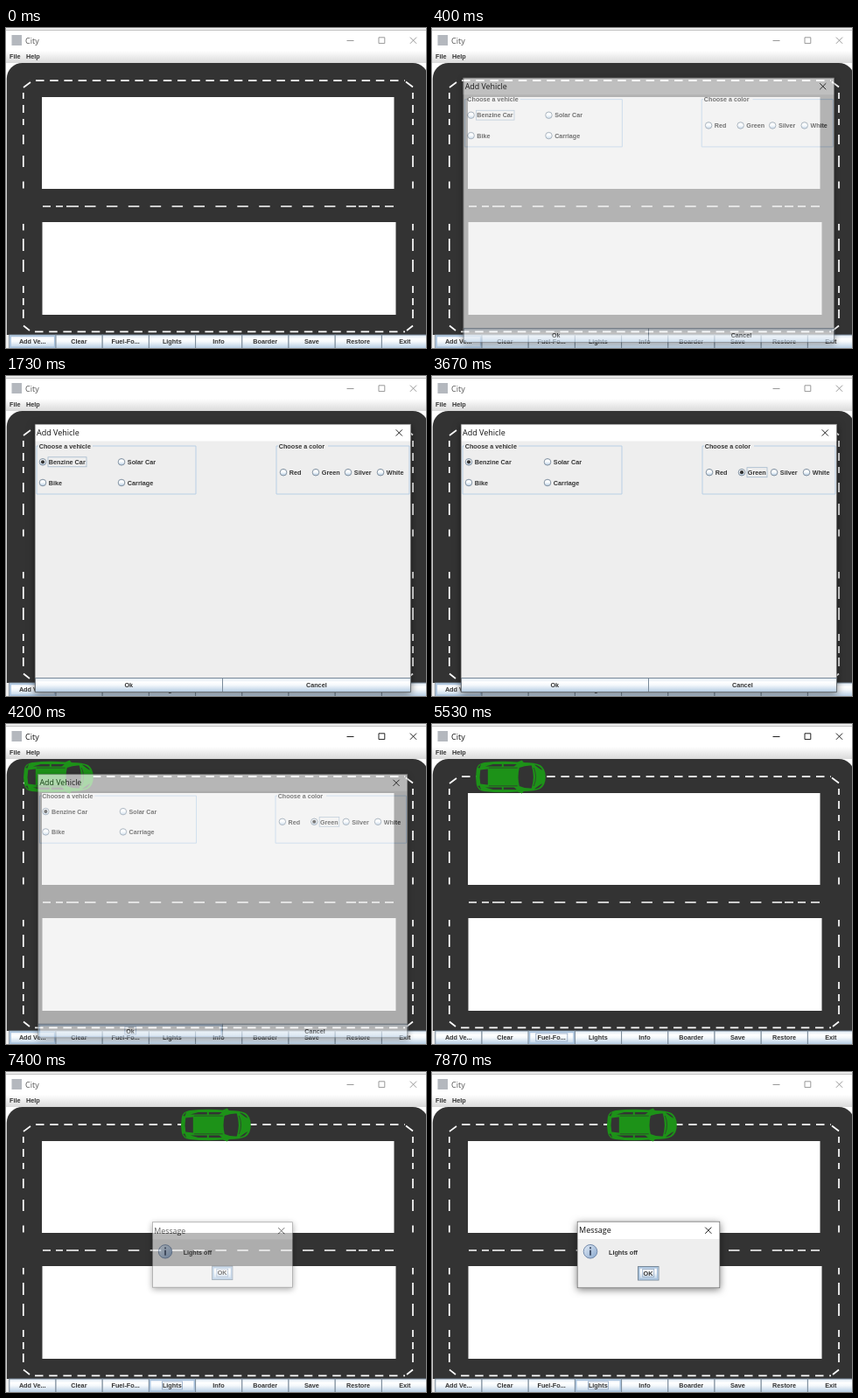
An HTML page for the animation above (8000 ms loop, 480 by 366 pixels).

```html
<!DOCTYPE html>
<html lang="en">
<head>
<meta charset="utf-8">
<title>City</title>
<style>
  html, body { margin: 0; width: 100%; height: 100%; overflow: hidden; background: #fff; }
  svg { display: block; width: 100vw; height: 100vh; }
  text { font: bold 7.25px "Liberation Sans", Arial, sans-serif; fill: #333; }
  .title { font: 9px "Open Sans", "Noto Sans", sans-serif; fill: #111; }
  .mid { text-anchor: middle; }
  .dialog { filter: drop-shadow(0 2px 4px rgba(0, 0, 0, .5)); }
</style>
</head>
<body>
<svg id="stage" viewBox="0 0 480 366" xmlns="http://www.w3.org/2000/svg">
  <defs>
    <linearGradient id="metal" x2="0" y2="1">
      <stop offset="0" stop-color="#dde8f3"/>
      <stop offset=".3" stop-color="#fff"/>
      <stop offset=".5" stop-color="#f4f8fb"/>
      <stop offset="1" stop-color="#b3cbe3"/>
    </linearGradient>
    <linearGradient id="menu" x2="0" y2="1">
      <stop offset="0" stop-color="#fff"/>
      <stop offset="1" stop-color="#dadada"/>
    </linearGradient>
    <linearGradient id="info" x2="1" y2="1">
      <stop offset="0" stop-color="#e4edf7"/>
      <stop offset="1" stop-color="#86a5cc"/>
    </linearGradient>
  </defs>
</svg>
<script>
const LOOP = 8000;
const NS = "http://www.w3.org/2000/svg";
const stage = document.getElementById("stage");

function el(parent, tag, attrs = {}, text) {
  const node = document.createElementNS(NS, tag);
  for (const k in attrs) node.setAttribute(k, attrs[k]);
  if (text) node.textContent = text;
  return parent.appendChild(node);
}
const group = (parent, attrs) => el(parent, "g", attrs);
const rect = (p, x, y, width, height, fill, more) => el(p, "rect", { x, y, width, height, fill, ...more });
const path = (p, d, stroke, width = 1, fill = "none") =>
  el(p, "path", { d, stroke, "stroke-width": width, fill });
const label = (p, x, y, text, cls = "") => el(p, "text", { x, y, class: cls }, text);
const cross = (p, x, y, r, color) =>
  path(p, `M${x - r} ${y - r}l${2 * r} ${2 * r}m0 ${-2 * r}l${-2 * r} ${2 * r}`, color);
const show = (node, on) => node.setAttribute("visibility", on ? "visible" : "hidden");
const clamp = v => Math.max(0, Math.min(1, v));

// Button with a gradient face, a hover frame and a focus box.
function button(p, x, y, w, h, text, focusWidth) {
  const face = rect(p, x + .5, y + .5, w, h, "url(#metal)", { stroke: "#7a8a99" });
  const hover = rect(p, x + 1.8, y + 1.8, w - 2.6, h - 2.6, "none", { stroke: "#a9c3de", "stroke-width": 1.6 });
  const focus = rect(p, x + w / 2 - focusWidth / 2 + .5, y + 3.5, focusWidth, 9, "none",
    { stroke: "#8fa6c2", "stroke-width": .8 });
  label(p, x + w / 2 + .3, y + h / 2 + 3, text, "mid");
  return (isFocused, isHot, isDown) => {
    show(focus, isFocused);
    show(hover, isHot);
    face.setAttribute("fill", isDown ? "#b8cfe5" : "url(#metal)");
  };
}

function radio(p, x, y, text, width) {
  el(p, "circle", { cx: x, cy: y, r: 3.8, fill: "url(#metal)", stroke: "#7a8a99", "stroke-width": .9 });
  const dot = el(p, "circle", { cx: x, cy: y, r: 2.1, fill: "#333" });
  const focus = rect(p, x + 6, y - 5.5, width + 1.5, 11, "none", { stroke: "#a3b8cc", "stroke-width": .8 });
  label(p, x + 6.8, y + 2.8, text);
  return (isOn, isFocused) => { show(dot, isOn); show(focus, isFocused); };
}

function frame(p, x, w, title, titleWidth) {
  path(p, `M${x + 2} 80H${x}V135H${x + w}V80H${x + titleWidth + 4}`, "#b8cfe5");
  label(p, x + 2.7, 82.6, title);
}

function dialogBox(x, y, w, h, bar, title) {
  const g = group(stage, { class: "dialog" });
  rect(g, x, y, w, h, "#eee");
  rect(g, x, y, w, bar, "#fff");
  label(g, x + 2, y + bar / 2 + 3.4, title, "title");
  cross(g, x + w - 13.2, y + bar / 2 + .2, 3.6, "#222");
  return g;
}
const outline = (g, x, y, w, h) => rect(g, x + .2, y + .2, w - .4, h - .4, "none", { stroke: "#666", "stroke-width": .7 });

// Window frame and menu
rect(stage, 0, 0, 480, 366, "#fff");
rect(stage, 0, 0, 480, 2, "#eee");
rect(stage, 0, 2, 480, .8, "#b0b0b0");
rect(stage, 6.5, 8, 11.5, 12, "#b4b8be");
const caption = label(stage, 22, 17.6, "City", "title");
const controls = group(stage);
path(controls, "M389.5 14.5h8M426 10.8h6.8v6.8h-6.8z", "currentColor");
cross(controls, 465.5, 14.2, 3.6, "currentColor");
rect(stage, 0, 26, 480, 14, "url(#menu)");
label(stage, 4, 35, "File");
label(stage, 23, 35, "Help");

// Road
rect(stage, .8, 40, 482, 330, "#333", { rx: 18 });
rect(stage, 41, 79, 402.5, 105, "#fff");
rect(stage, 41.5, 222, 404, 106, "#fff");

const marks = [];
const hDashes = (y, from, to, step, len) => {
  for (let x = from; x < to; x += step) marks.push(`M${x} ${y}h${Math.min(len, to - x)}`);
};
hDashes(60.2, 34, 456, 16.2, 9.5);
hDashes(347.4, 33, 456, 16.2, 9.5);
hDashes(204, 90, 400, 24.9, 12.5);
marks.push("M42 204h9m6 0h8m4 0h14M403 204h10m5 0h9m6 0h10");
const ticks = [[74, 7], [88, 9], [104, 7], [122, 11], [146, 13], [175.5, 8],
  [224, 7.5], [241, 14], [265, 14], [295, 8], [309, 8], [322, 10]];
for (const x of [19.8, 465])
  for (const [y, len] of ticks) marks.push(`M${x} ${y}v${len}`);
marks.push("M20 68l8-6M457 61.5l8 6M20 340.5l7 5.5M458 346l7-5.5");
path(stage, marks.join(""), "#fff", 1.7);

// Car, nose to the right
const car = group(stage);
path(car, "M1 52Q2 45 10 44Q28 42 48 43.4L53 41.6L55 44Q68 44 74 47Q80 51 80 60.5Q80 70 74 74Q68 77 55 77L53 79.4L48 77.6Q28 79 10 77Q2 76 1 69Q-.5 60.5 1 52z", "none", 0, "#1d9218");
path(car, "M5.5 52.5L14 51.5V69.5L5.5 68.5Q4 60.5 5.5 52.5zM50 50Q57 47 64 47.5Q68 60.5 64 73.5Q57 74 50 71Q47.5 60.5 50 50z", "none", 0, "#333");
path(car, "M11 48.5L20 46H30V48.6zM32 46H47L44 48.6H32zM11 72.5L20 75H30V72.4zM32 75H47L44 72.4H32z", "none", 0, "#333");
path(car, "M67 46.5Q74 47.5 76.5 53L73 51zM67 74.5Q74 73.5 76.5 68L73 70zM2.5 50l4-4.5l-2 5zM2.5 71l4 4.5l-2-5z", "none", 0, "#333");
path(car, "M15 50.2H48M15 70.8H48M66.5 50Q71 60.5 66.5 71", "#333", .7);

// Toolbar
rect(stage, 0, 351, 480, 15, "#eee");
const names = ["Add Ve...", "Clear", "Fuel-Fo...", "Lights", "Info", "Boarder", "Save", "Restore", "Exit"];
const tools = names.map((name, i) => button(stage, 3.3 + i * 53.2, 350.5, 53.2, 15.5, name, 4 + name.length * 3.2));

// Add Vehicle dialog
const add = dialogBox(33, 55, 429.5, 306.5, 19.5, "Add Vehicle");
frame(add, 35, 182, "Choose a vehicle", 60);
frame(add, 309, 152, "Choose a color", 55);
const benzine = radio(add, 42, 98.3, "Benzine Car", 42.5);
const green = radio(add, 354, 110.2, "Green", 21.5);
const others = [[132, 98.3, "Solar Car"], [42, 122, "Bike"], [132, 122, "Carriage"],
  [317, 110.2, "Red"], [391, 110.2, "Silver"], [428, 110.2, "White"]];
for (const [x, y, text] of others) radio(add, x, y, text, 0)(false, false);
const ok = button(add, 33, 345, 214, 16, "Ok", 13);
button(add, 247, 345, 215, 16, "Cancel", 28)(false, false, false);
outline(add, 33, 55, 429.5, 306.5);

// Message dialog
const msg = dialogBox(166, 171, 163, 76, 20, "Message");
el(msg, "circle", { cx: 181, cy: 205.3, r: 7.8, fill: "url(#info)", stroke: "#7189aa" });
path(msg, "M181 203.7v6M181 200.3v1.9", "#3d4c66", 1.8);
label(msg, 202, 209, "Lights off");
button(msg, 235, 222, 23.5, 15.5, "OK", 13)(true, true, false);
outline(msg, 166, 171, 163, 76);

// Windows fade and grow about their centre.
function pose(node, p, cx, cy) {
  const s = 1 - .13 * (1 - p) ** 2;
  show(node, p > 0);
  node.setAttribute("opacity", p);
  node.setAttribute("transform", `translate(${cx} ${cy}) scale(${s}) translate(${-cx} ${-cy})`);
  node.style.display = p > 0 ? "" : "none";
}

function draw(t) {
  const between = (a, b) => t >= a && t < b;

  const active = between(4200, 7270);
  caption.style.fill = active ? "#111" : "#555";
  controls.style.color = active ? "#222" : "#999";

  const current = t < 4800 ? 0 : t < 6930 ? 2 : 3;
  const down = between(70, 200) || between(4800, 5000) || between(6930, 7130);
  tools.forEach((set, i) => {
    const on = i === current;
    set(on && current > 0, on, on && down);
  });

  const addShown = t < 2000 ? clamp((t - 300) / 147) : clamp(1 - (t - 4130) / 200);
  pose(add, addShown, 247.7, 208.2);
  benzine(t >= 1070, t < 2730);
  green(t >= 2730, t >= 2730);
  ok(between(3930, 4400), t >= 3930, between(3930, 4130));

  // Waits, then drives in hops of 10 px until the lights button is used.
  const hops = t < 5330 ? 0 : Math.min(18, 1 + Math.floor((t - 5330) / 94.5));
  show(car, t >= 4200);
  car.setAttribute("transform", `translate(${20 + 10 * hops - .2} 0)`);

  pose(msg, clamp((t - 7270) / 200), 247.5, 209);
}

const start = performance.now();
function tick() {
  draw((performance.now() - start) % LOOP);
  requestAnimationFrame(tick);
}
tick();
</script>
</body>
</html>
```
